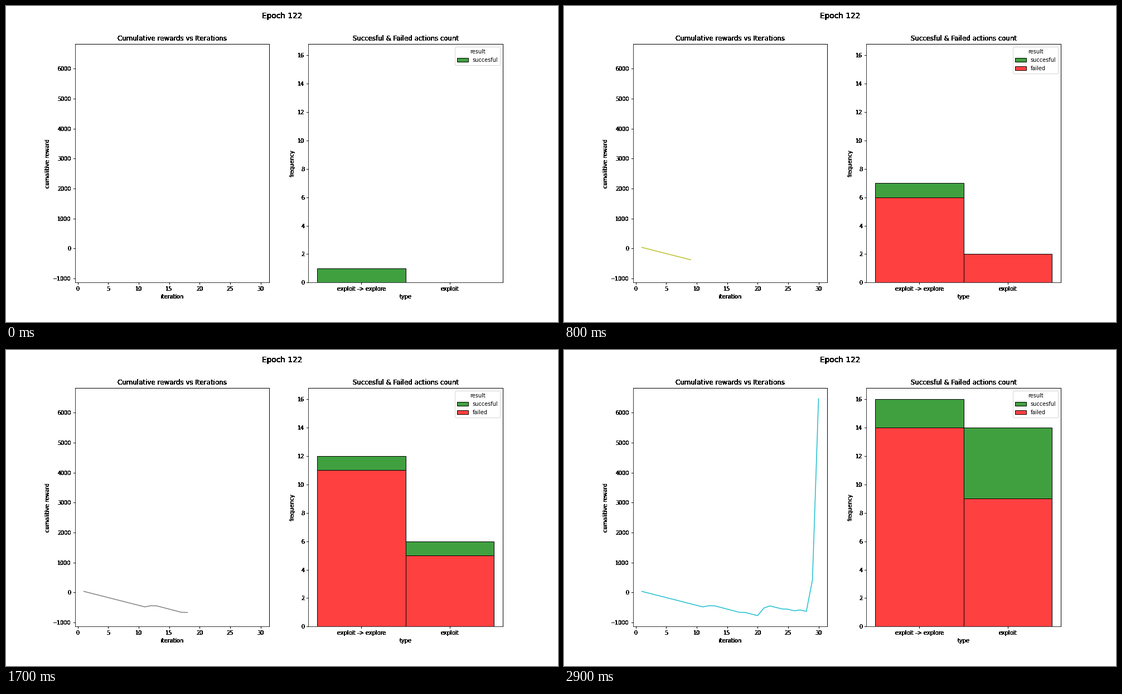
A matplotlib script for the animation above (3000 ms loop, 990 by 566 pixels).

```python
import numpy as np
import matplotlib.pyplot as plt
from matplotlib.animation import FuncAnimation
from matplotlib.patches import Patch

W, H = 990, 566
DPI = W / 14  # the layout is 14 inches wide
STEPS, INTERVAL = 30, 100

plt.rcParams.update({"font.family": "DejaVu Sans", "font.size": 10})

# Reward curve: corner points, linear in between.
CORNERS = [(1, 35), (11, -482), (12, -445), (13, -450), (17, -662), (18, -670),
           (20, -775), (21, -525), (22, -450), (24, -550), (25, -560),
           (26, -612), (27, -585), (28, -632), (29, 415), (30, 6463)]
steps = np.arange(1, STEPS + 1)
rewards = np.interp(steps, *zip(*CORNERS))

# One letter per action: upper case = exploit -> explore, lower case = exploit;
# s = succesful, f = failed.
ACTIONS = "SFFFfFFFfFFsfFfFFfFFSsffffsFss"
KINDS = [("S", "F"), ("s", "f")]

GREEN = (0, 0.5, 0, 0.75)
RED = (1, 0, 0, 0.75)


def hard_edges(img, dpi):
    """Turn every clearly touched pixel solid black, without antialiasing."""
    out = np.zeros_like(img)
    out[..., 3] = img[..., 3] > 0.12
    return out, 0, 0


def style_axes(ax, title, xlabel, ylabel):
    ax.set_title(title, fontsize=12)
    ax.set_xlabel(xlabel)
    ax.set_ylabel(ylabel)
    for part in (ax.title, ax.xaxis, ax.yaxis, ax.spines["top"], ax.spines["right"]):
        part.set_agg_filter(hard_edges)


# The small surplus keeps the pixel size from being rounded down.
fig, (ax_line, ax_bar) = plt.subplots(
    1, 2, figsize=((W + 0.01) / DPI, (H + 0.01) / DPI), dpi=DPI, facecolor="white")
fig.subplots_adjust(left=0.125, right=0.9, bottom=0.125, top=0.88, wspace=0.201)
fig.suptitle("Epoch 122", fontsize=14).set_agg_filter(hard_edges)

style_axes(ax_line, "Cumulative rewards vs Iterations", "iteration", "cumalitive reward")
margin = 0.05 * np.ptp(rewards)
ax_line.set_xlim(-0.45, 31.45)
ax_line.set_ylim(rewards.min() - margin, rewards.max() + margin)
ax_line.set_xticks(range(0, 31, 5))
ax_line.set_yticks(range(-1000, 6001, 1000))
curve, = ax_line.plot([], [], lw=1.5)

style_axes(ax_bar, "Succesful & Failed actions count", "type", "frequency")
edge = dict(edgecolor="black", linewidth=1)
won_bars = ax_bar.bar([0, 1], [0, 0], width=1, color=GREEN, **edge)
lost_bars = ax_bar.bar([0, 1], [0, 0], width=1, color=RED, **edge)
ax_bar.set_xlim(-0.6, 1.6)
ax_bar.set_ylim(0, 16.8)
ax_bar.set_xticks([0, 1], ["exploit -> explore", "exploit"])
ax_bar.set_yticks(range(0, 17, 2))

handles = [Patch(facecolor=color, label=name, **edge)
           for color, name in ((GREEN, "succesful"), (RED, "failed"))]


def update(i):
    n = i + 1
    curve.set_data(steps[:n], rewards[:n])
    curve.set_color(f"C{i % 10}")

    done = ACTIONS[:n]
    for (win, loss), won, lost in zip(KINDS, won_bars, lost_bars):
        lost.set_height(done.count(loss))
        won.set_y(done.count(loss))
        won.set_height(done.count(win))

    any_lost = "f" in done.lower()
    ax_bar.legend(handles=handles[:1 + any_lost], title="result", loc="upper right")
    return []


anim = FuncAnimation(fig, update, frames=STEPS, interval=INTERVAL,
                     init_func=lambda: [], repeat=True, repeat_delay=0, blit=False)
plt.show()
```
